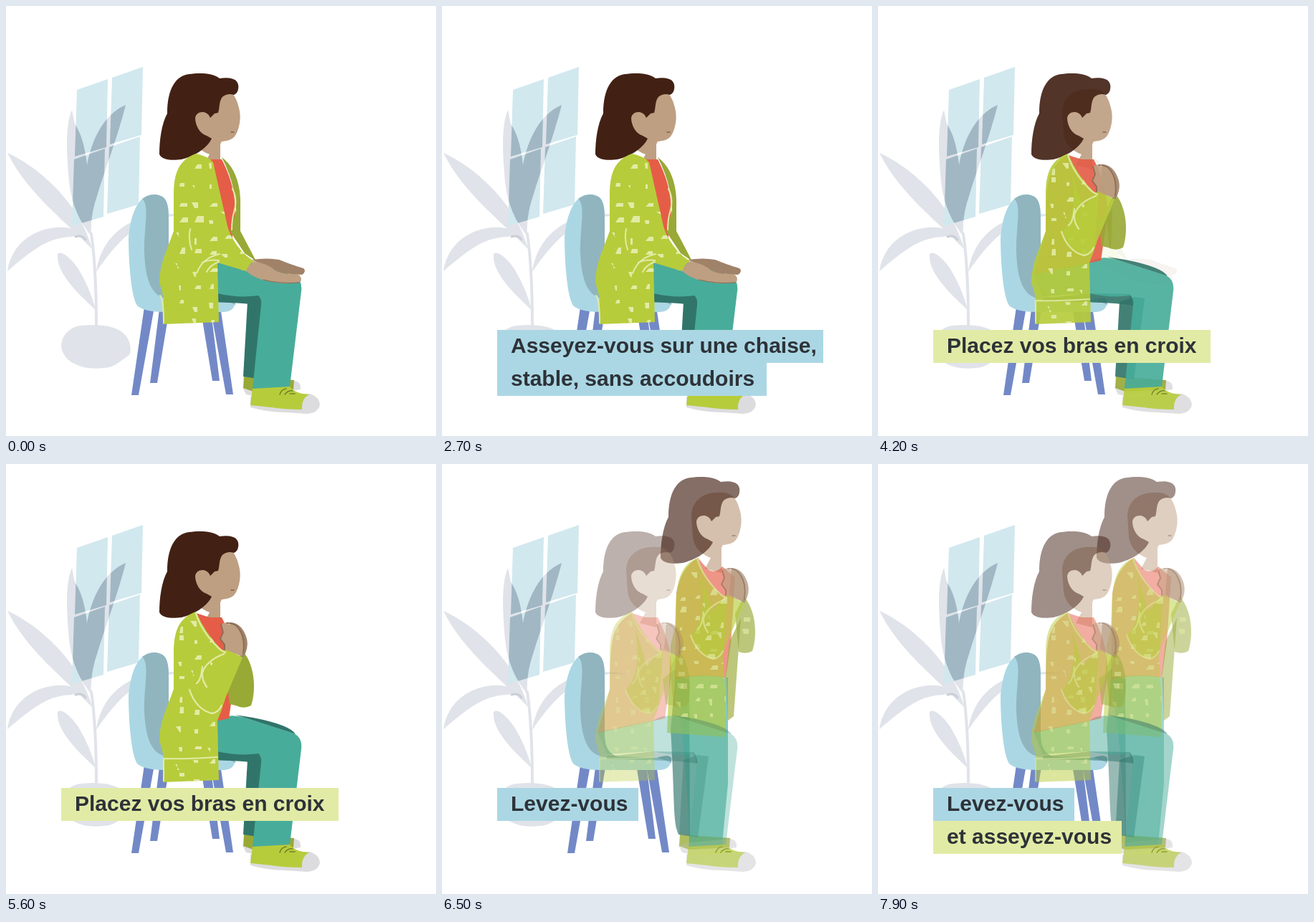
An HTML page that plays this animation: 600x600 px, repeating every 8 s.

```html
<!DOCTYPE html>
<html lang="fr">
<head>
<meta charset="utf-8">
<style>
html, body { margin: 0; width: 100%; height: 100%; overflow: hidden; background: #fff; }
svg { display: block; width: 600px; height: 600px; }
text { font: bold 30px "Liberation Sans", Arial, sans-serif; fill: #2d3238; }
</style>
</head>
<body>
<svg id="stage" viewBox="0 0 600 600"></svg>
<script>
const C = {
  leaf: '#e0e3e9', pane: '#d1e8ee', shade: '#a1b7c4', blue: '#abd7e4', blueDark: '#90b5bf', leg: '#7389c7',
  coat: '#b7cc3b', coatDark: '#99a936', light: '#e2eba5', red: '#e55d47', skin: '#be9f81', skinDark: '#a08269',
  hair: '#422114', teal: '#48ac9a', tealDark: '#31756a', sole: '#dcdcde', crease: '#8b6a55'
};
const fill = (color, d) => `<path fill="${color}" d="${d}"/>`;
const line = (color, d, w = 2) =>
  `<path fill="none" stroke="${color}" stroke-width="${w}" stroke-linecap="round" d="${d}"/>`;
const move = (x, y, s) => `<g transform="translate(${x} ${y})">${s}</g>`;
let clips = 0;
const clip = (d, s) => `<clipPath id="clip${++clips}"><path d="${d}"/></clipPath><g clip-path="url(#clip${clips})">${s}</g>`;

// Scattered pale rectangles, seeded so that they stay put
let seed = 11;
const rnd = (a, b) => {
  seed = seed * 16807 % 2147483647;
  return a + Math.floor(seed / 2147483647 * (b - a));
};
function patches(x, y, w, h) {
  let d = '';
  for (let row = y; row < y + h; row += 24)
    for (let col = x; col < x + w; col += 21)
      d += `M${col + rnd(0, 12)} ${row + rnd(0, 15)}h${rnd(3, 10)}v${rnd(4, 10)}H${col + 6}z`;
  return fill(C.light, d);
}
const cloth = (color, d, ...area) => fill(color, d) + clip(d, patches(...area));

// Room
let panes = '';
for (const [col, row] of [[0, 0], [1, 0], [0, 1], [1, 1]])
  panes += `M${99 + 49 * col - 4 * row} ${117 - 17 * col + 97 * row}l43-15-2 95-44 13z`;
const tallLeaves = 'M92 145C83 165 84 203 88 245Q93 290 119 321Q117 293 128 262C137 232 156 182 167 138C137 151 120 185 113 222Q109 183 96 165Z';
const room =
  fill(C.leaf, 'M77 474C78 458 91 447 105 446C127 443 153 446 163 456C173 463 176 480 172 487C162 493 152 505 136 505C114 508 101 502 93 498C85 494 78 485 77 474Z') +
  line(C.leaf, 'M126 447Q126 365 119 318', 4) +
  fill(C.leaf, 'M2 205C45 224 103 275 120 339C82 300 29 260 2 205Z') +
  fill(C.leaf, 'M2 370C8 329 44 307 82 309Q105 311 115 325Q103 318 92 322C60 323 42 336 2 370Z') +
  line('#c9cfd8', 'M97 322Q106 319 111 326', 3) +
  fill(C.leaf, 'M72 346C77 340 91 352 101 367Q118 395 125 424C107 407 69 374 72 346Z') +
  fill(C.leaf, 'M126 371C133 320 177 279 260 293C195 289 164 316 126 371Z') +
  fill(C.leaf, tallLeaves) + fill(C.pane, panes) + clip(panes, fill(C.shade, tallLeaves));

const chairLeg = (x, y, footX, footY) => `M${x} ${y}h14L${footX + 10} ${footY}h-10z`;
const chair =
  fill(C.leg, chairLeg(193, 420, 175, 543) + chairLeg(214, 423, 201, 526) + chairLeg(272, 426, 288, 523) + chairLeg(286, 426, 307, 542)) +
  fill(C.blue, 'M183 418C173 402 171 345 171 323C174 292 183 263 207 263C226 264 227 278 227 300V380Q228 404 245 408L300 410Q318 404 320 411Q320 426 304 427H222Q193 427 183 418Z') +
  fill(C.blueDark, 'M190 269Q198 263 207 263C226 264 227 278 227 300V380Q228 404 245 408L232 409C207 409 195 391 193 345C192 313 201 278 190 269Z') +
  fill(C.blueDark, 'M300 410Q318 404 320 411V417Q312 413 300 410Z');

// Figure
const shoes =
  fill(C.sole, 'M330 532L335 542 345 544 400 537 411 535Q412 524 402 523L345 528Z') +
  fill(C.coatDark, 'M332 517L345 518 402 522 401 535 345 538 331 533Z') +
  fill(C.sole, 'M341 545V560Q365 567 390 567L420 569Q436 568 438 556Q437 545 424 541Z') +
  fill(C.coat, 'M344 533L396 531Q403 541 423 542Q412 548 413 563Q388 563 370 560L341 557Z') +
  line('#6f8128', 'M382 542Q384 535 391 534M389 542Q394 536 400 537M396 541L403 541', 1.5);

const head =
  fill(C.skin, 'M300 116C314 116 321 125 325 142C329 157 325 171 321 179C316 188 308 188 301 189L299 193V228L276 222 284 207Q262 199 259 178L257 148C258 126 275 114 300 116Z') +
  fill(C.hair, 'M324 116C326 105 319 98 298 101C289 93 268 93 256 95C237 97 225 115 225 150C217 164 214 188 214 207C219 217 237 215 245 214C261 210 280 200 287 185L280 181C270 178 264 166 264 156Q266 147 276 148Q283 150 285 156L291 150 296 149C299 142 296 127 307 124Q312 122 318 124Q323 122 324 116Z') +
  line('#865f4b', 'M314 176h4', 1.5);

const sitLegs =
  fill(C.tealDark, 'M337 413L357 406 372 408 357 521 331 517Z') +
  fill(C.tealDark, 'M230 408L295 401 352 402 357 418Q328 413 230 412Z') +
  fill(C.teal, 'M217 374L295 358Q309 347 333 354L402 376Q414 382 412 398L396 531 344 534 356 417 352 404Q325 408 295 401L230 405Z') +
  line(C.tealDark, 'M352 405Q356 410 355 416');

const sitBack = 'M265 206C241 215 235 233 234 259V314C222 347 215 359 214 386Q219 401 220 410L219 444 297 441 295 358';
const sitTorso = fill(C.red, 'M265 208L284 214 301 214C314 239 324 270 318 307L311 355 297 358 217 375 234 315C235 250 234 226 265 208Z');

const handsOnLap =
  shoes + sitLegs + head + sitTorso +
  fill(C.coatDark, 'M301 211C320 225 328 250 327 280V314L349 356 333 345 313 315 321 285Q320 248 301 211Z') +
  line(C.light, 'M316 255Q323 269 319 284Q315 297 315 312') +
  fill(C.skinDark, 'M343 354Q365 351 381 354C394 359 402 362 415 366Q420 370 413 375L385 373 361 362Z') +
  fill(C.skin, 'M333 368L346 356Q365 360 373 367Q382 375 407 374Q414 378 411 385Q388 389 373 385Q347 382 333 368Z') +
  line(C.crease, 'M359 382Q382 388 409 386', 1) +
  cloth(C.coat, sitBack + 'L335 370Q338 361 346 356C328 345 314 325 309 307L289 218Q283 210 265 206Z', 236, 215, 95, 218) +
  line(C.light, 'M257 311Q254 326 259 340M298 346C282 350 272 357 266 373M297 355Q284 353 274 358M297 357Q285 361 280 371M215 404Q220 410 220 442');

// Crossed arms, in seated coordinates
const farSleeve = cloth(C.coatDark, 'M330 261C344 275 351 309 342 337Q333 342 323 338L318 285Z', 324, 280, 20, 44);
const nearSleeve = 'M270 230Q280 290 257 315Q272 349 289 348Q302 345 306 327L330 270 307 257 286 282Z';
const arms =
  fill(C.skinDark, 'M313 221Q330 222 336 244Q339 256 331 270L310 258Z') +
  cloth(C.coat, nearSleeve, 270, 262, 42, 75) +
  fill(C.skin, 'M300 226Q303 219 309 223L320 225Q333 237 332 256L329 268 306 259 305 251 299 244 303 235Z') +
  line(C.crease, 'M300 224L303 235 299 244 305 252V259M308 222Q319 221 325 230Q334 243 331 264', 1.8) +
  line(C.light, 'M265 208Q273 235 299 259L306 263M304 265Q280 274 274 291Q273 301 280 311M256 315Q265 342 287 348Q296 347 301 337M274 283Q272 302 266 306', 2.3);

const crossed =
  shoes + fill(C.tealDark, 'M320 350L345 354Q396 364 404 377Z') + sitLegs + head + sitTorso +
  fill(C.coatDark, 'M308 300L327 285 325 338 312 335Z') +
  cloth(C.coat, sitBack + 'L302 340 308 265Q282 244 265 206Z', 236, 215, 60, 218) +
  farSleeve + arms +
  line(C.light, 'M220 412V442M220 411Q255 412 295 409');

const standing =
  shoes +
  fill(C.tealDark, 'M326 296L345 300 346 519 330 517C322 500 325 470 319 370Z') +
  fill(C.teal, 'M325 298Q365 292 399 298V446L391 531 345 534Q344 465 335 375Z') +
  move(91, -76, head) +
  fill(C.red, 'M357 131L371 147Q382 154 391 143L409 158 403 250 396 298Q360 292 325 301L327 180Q333 145 357 131Z') +
  fill(C.coatDark, 'M401 248L417 215 407 352 399 358 396 293Z') +
  cloth(C.coat, 'M357 131C331 141 327 168 326 202L325 228 319 253 314 375 395 381 396 330 392 270 397 188Q369 169 357 131Z', 326, 150, 66, 212) +
  move(91, -76, farSleeve + arms);

const bar = (text, color, width, row) =>
  `<rect x="77" y="${452 + 46 * row}" width="${width}" height="46" fill="${color}"/><text x="96" y="${484 + 46 * row}">${text}</text>`;

// Each part fades in and out at the given times
const poseFade = 500, barFade = 300;
const [cross, rise, sit] = [3750, 6175, 7650];
const parts = [
  { art: handsOnLap, span: poseFade, on: [-poseFade], off: [cross] },
  { art: standing, span: poseFade, on: [rise], off: [sit] },
  { art: crossed, span: poseFade, on: [cross, sit], off: [rise] },
  { art: bar('Asseyez-vous sur une chaise,', C.blue, 455, 0) + bar('stable, sans accoudoirs', C.blue, 376, 1), span: barFade, on: [350], off: [3250] },
  { art: bar('Placez vos bras en croix', C.light, 387, 0), span: barFade, on: [cross - 100], off: [rise - 475] },
  { art: bar('Levez-vous', C.blue, 197, 0), span: barFade, on: [rise - 175], off: [] },
  { art: bar('et asseyez-vous', C.light, 263, 1), span: barFade, on: [sit - 100], off: [] }
];
const stage = document.getElementById('stage');
stage.innerHTML = room + chair + parts.map(p => `<g class="part">${p.art}</g>`).join('');
const groups = stage.querySelectorAll('.part');

const origin = performance.now();
function draw() {
  const t = (performance.now() - origin) % 8000;
  parts.forEach(({ span, on, off }, i) => {
    const total = times => times.reduce((sum, at) => sum + Math.min(1, Math.max(0, (t - at) / span)), 0);
    const opacity = total(on) - total(off);
    const style = groups[i].style;
    // Inherited, so overlapping shapes show through one another
    style.fillOpacity = style.strokeOpacity = opacity;
    style.visibility = opacity > 0 ? 'visible' : 'hidden';
  });
  requestAnimationFrame(draw);
}
draw();
</script>
</body>
</html>
```
